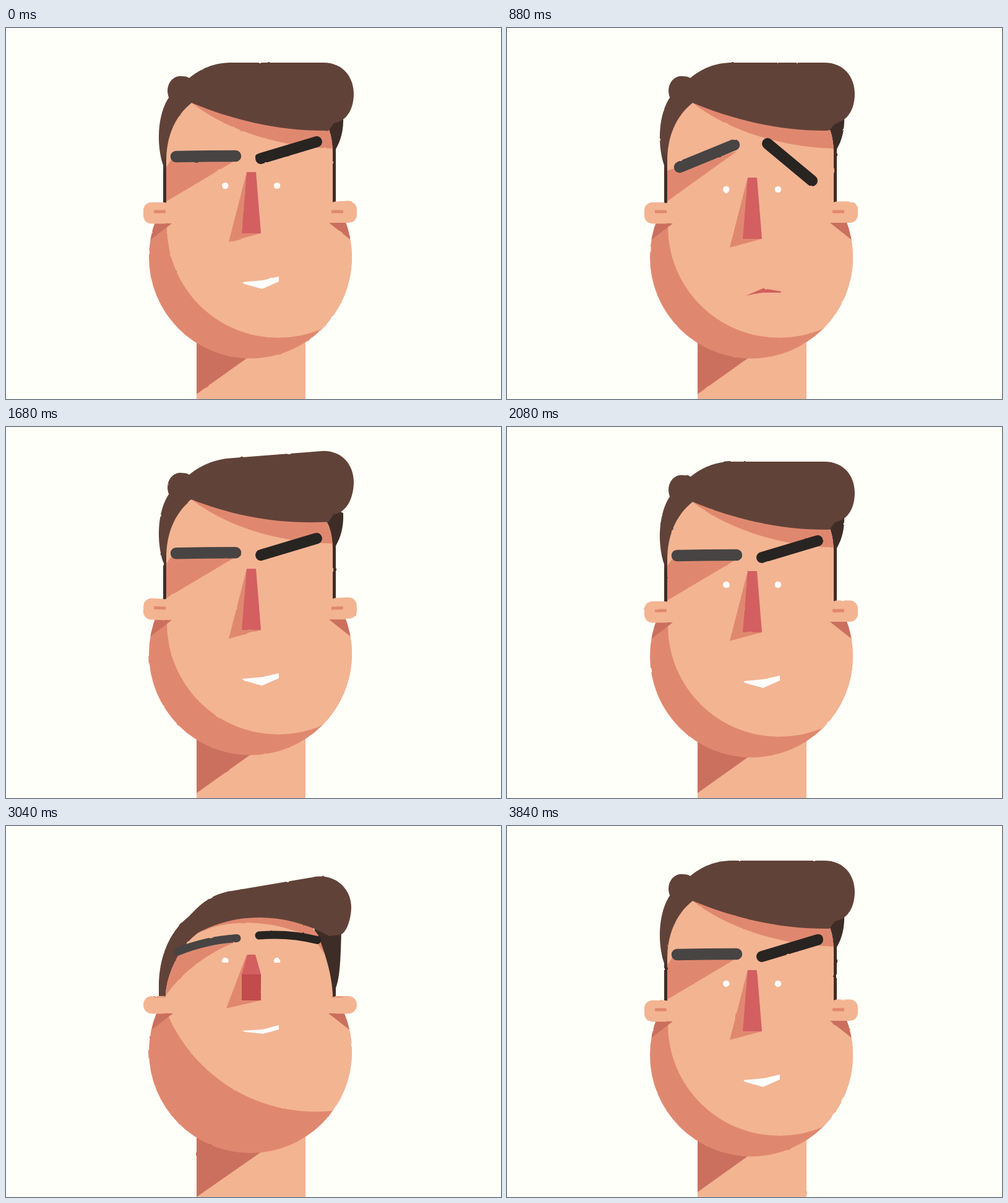
An HTML page with a canvas for the animation above (3880 ms loop, 800 by 600 pixels).

```html
<!DOCTYPE html>
<html lang="en">
<head>
<meta charset="utf-8">
<title>Moods</title>
<style>
  html, body { margin: 0; width: 100%; height: 100%; overflow: hidden; background: #fefff8; }
  main { position: absolute; left: 0; top: 0; width: 800px; height: 600px; overflow: clip; }
  canvas { display: block; filter: url(#rough); }
  svg { position: absolute; left: 0; top: 0; width: 0; height: 0; }
</style>
</head>
<body>
<svg aria-hidden="true">
  <filter id="rough" x="0" y="0" width="100%" height="100%" color-interpolation-filters="sRGB">
    <feTurbulence id="grain" type="fractalNoise" baseFrequency="0.08" numOctaves="1" seed="1" result="n"/>
    <feDisplacementMap in="SourceGraphic" in2="n" scale="2.2" xChannelSelector="R" yChannelSelector="G"/>
  </filter>
</svg>
<main><canvas id="stage" width="800" height="606"></canvas></main>
<script>
const ctx = document.getElementById('stage').getContext('2d');
const grain = document.getElementById('grain');
const LOOP = 3880;
const C = {
  bg: '#fefff8', skin: '#f3b492', shade: '#e0886f', deep: '#cb705e',
  hair: '#614238', back: '#3e2d27', nose: '#d35f61', tip: '#c14b4d',
  browL: '#474443', browR: '#282421', white: '#ffffff'
};

// Eased value of a list of [time, value] keys
function track(t, keys) {
  if (t <= keys[0][0]) return keys[0][1];
  for (let i = 1; i < keys.length; i++) {
    const [t0, a] = keys[i - 1], [t1, b] = keys[i];
    if (t < t1) {
      const k = (t - t0) / (t1 - t0);
      return a + (b - a) * k * k * (3 - 2 * k);
    }
  }
  return keys[keys.length - 1][1];
}

const HOPS = [120, 1400];
const BLINKS = [120, 1400, 2040, 3040];
const hop = (t, keys) => HOPS.reduce((sum, s) => sum + track(t - s, keys), 0);
const blink = t => BLINKS.reduce((sum, s) =>
  sum + track(t - s, [[60, 0], [140, 1], [310, 1], [400, 0]]), 0);

const MOTION = {
  sad: [[220, 0], [400, 1], [1500, 1], [1680, 0]],
  up: [[2140, 0], [2350, 1.03], [2460, 1], [3080, 1], [3270, -0.04], [3390, 0]],
  bob: [[0, 0], [80, 6], [200, -20], [350, 9], [480, 0]],
  flop: [[0, 0], [130, 10], [235, -30], [355, 20], [480, 0]],
  ear: [[0, 0], [120, 8], [230, -9], [355, 8], [480, 0]],
  tuft: [[2130, 0], [2240, -30], [2380, 8], [2460, 0],
         [3080, 0], [3180, 12], [3300, -13], [3400, 0]]
};

let sad, up, flop;

// Blend of the smirk, sad and raised poses
const mix = (s, d = s, u = s) => s + (d - s) * sad + (u - s) * up;

function shape(s, d, u, bend = 0) {
  const nums = str => str.match(/[\d.]+/g).map(Number);
  const a = nums(s), b = d ? nums(d) : a, c = u ? nums(u) : a;
  const v = a.map((n, i) => mix(n, b[i], c[i]));
  if (bend) {
    for (let i = 0; i < v.length; i += 2) {
      const w = Math.min(1, Math.max(0, (v[i] - 340) / 170));
      v[i + 1] += flop * bend * w * (v[i + 1] > 140 ? 0.65 : 1);
    }
  }
  let i = 0;
  return new Path2D(s.replace(/[\d.]+/g, () => v[i++].toFixed(2)));
}

function fill(path, color) {
  ctx.fillStyle = color;
  ctx.fill(path);
}

function disc(x, y, r) {
  const p = new Path2D();
  p.arc(x, y, r, 0, 7);
  return p;
}

function box(x, y, w, h, r = 0) {
  const p = new Path2D();
  p.roundRect(x, y, w, h, r);
  return p;
}

function clipped(path, draw) {
  ctx.save();
  ctx.clip(path);
  draw();
  ctx.restore();
}

function neck() {
  fill(box(308, 460, 176, 160), C.skin);
  fill(shape('M308 480L465 480L308 592Z', null, 'M308 480L480 480L308 600Z'), C.deep);
}

function backHair() {
  const y = mix(200, 200, 275), g = ctx.createLinearGradient(0, y, 0, y + 35);
  g.addColorStop(0, C.hair);
  g.addColorStop(1, C.back);
  fill(shape(
    'M254 285L254 222C243 190 244 140 264 111C285 85 300 100 330 110L330 285Z', null,
    'M247 280L247 260C247 215 262 172 296 146C306 134 320 130 330 130L330 280Z'), g);
  fill(shape(
    'M533 285L533 196C541 182 546 165 545 143L500 120L500 285Z', null,
    'M533 280L533 262C540 245 541 210 542 168L500 150L490 280Z'), C.back);
}

function jaw() {
  const top = mix(290, 290, 280);
  clipped(box(200, top, 400, 300), () => {
    const chin = disc(395, mix(370.5, 370.5, 365), 164);
    fill(chin, C.shade);
    clipped(chin, () => {
      fill(disc(mix(440, 440, 500), mix(321, 321, 202), mix(180, 180, 260)), C.skin);
      fill(shape('M220 316L268 316L220 353Z', null, 'M220 303L270 303L220 341Z'), C.deep);
      fill(shape('M522 315L570 315L570 353Z', null, 'M521 303L570 303L570 341Z'), C.deep);
    });
  });
}

function face() {
  const skin = shape(
    'M259 305L259 215C259 180 270 145 300 121C370 85 480 85 520 160C525 170 527 182 528 198L528 305Z', null,
    'M258 295L258 272C260 240 280 195 310 173C350 115 455 105 504 176C512 198 526 232 528 272L528 295Z');
  fill(skin, C.skin);
  clipped(skin, () => {
    fill(shape(
      'M300 121C350 160 430 192 530 195L531 195L531 80L300 80Z', null,
      'M318 170C360 150 440 150 500 185L531 232L531 80L300 80Z', 0.3), C.shade);
    fill(shape(
      'M250 237L268 212L371 214Q314 248 258 281L250 286Z',
      'M250 233L279 225L372 199Q315 240 258 281L250 286Z',
      'M250 245L278 203L372 187Q300 216 258 274L250 280Z'), C.shade);
  });
}

function nose() {
  fill(shape('M389 233L360 346L412 332Z', 'M389 242L360 355L412 341Z', 'M389 208L356 295L412 282Z'), C.shade);
  fill(shape(
    'M389 233L404 233L412 332L381 332Z',
    'M389 242L404 242L412 341L381 341Z',
    'M390 208L403 208L412 240L381 240Z'), C.nose);
  fill(shape(
    'M381 332L412 332L412 332L381 332Z',
    'M381 341L412 341L412 341L381 341Z',
    'M381 240L412 240L412 282L381 282Z'), C.tip);
}

function eye(x, lid) {
  const r = 5.3, y = mix(255, 261, 218);
  const top = y - r + 2 * r * Math.min(1, lid);
  const bottom = y + mix(r, r, 3);
  if (bottom > top) clipped(box(x - 8, top, 16, bottom - top), () => fill(disc(x, y, r), C.white));
}

function mouth() {
  fill(shape(
    'M382 411L415 408L441 402L441 410L414 422L385 414Z',
    'M386 433L414 421L443 426L443 428L414 428L400 430Z',
    'M382 331L415 329L441 322L441 329L416 336L386 333Z'), sad > 0.5 ? C.nose : C.white);
}

function ear(x, y, h, mark, pivot, turn) {
  ctx.save();
  ctx.translate(pivot, 299);
  ctx.rotate(turn * Math.PI / 180);
  ctx.translate(-pivot, -299);
  fill(box(x, mix(y, y, 275), 46, mix(h, h, 28.5), mix(13, 13, 14)), C.skin);
  fill(box(mark, mix(294.5, 294.5, 276), 19, mix(5, 5, 1.2), mix(1, 1, 0.4)), C.shade);
  ctx.restore();
}

function topHair() {
  fill(shape(
    'M263 112C256 92 270 76 284 78C290 78 294 79 296 81C315 66 335 56 365 56' +
    'L513 56C545 56 562 80 562 106C562 130 552 150 530 154L521 166C440 167 365 148 300 121Z', null,
    'M264 187C271 173 280 162 289 153C292 150 296 146 300 142C318 122 337 109 365 105' +
    'L495 83C530 75 558 100 558 131C558 150 550 174 540 176L522 178C450 138 370 140 310 173Z', 1), C.hair);
}

function brow(color, width, ...poses) {
  ctx.strokeStyle = color;
  ctx.lineWidth = mix(width, width, 13);
  ctx.lineCap = 'round';
  ctx.stroke(shape(...poses));
}

function draw(t) {
  sad = track(t, MOTION.sad);
  up = track(t, MOTION.up);
  flop = hop(t, MOTION.flop) + track(t, MOTION.tuft);
  const turn = hop(t, MOTION.ear);

  ctx.fillStyle = C.bg;
  ctx.fillRect(0, 0, 800, 606);
  neck();
  ctx.save();
  ctx.translate(0, hop(t, MOTION.bob));
  backHair();
  jaw();
  face();
  nose();
  eye(354.3, blink(t));
  eye(438, blink(t - 20));
  mouth();
  ear(222, 282, 34.5, 239, 262, -turn);
  ear(521, 280.5, 34.5, 526, 527, turn);
  topHair();
  brow(C.browL, 18.5, 'M275 208Q323 207 371 207', 'M279 225Q323 207 367 189', 'M278 203Q322 185 373 181.5');
  brow(C.browR, 18, 'M412 211Q457 197.5 502 184', 'M421 187Q457 217 493 247', 'M409 177Q458 173 503 184.5');
  ctx.restore();
}

function tick(now) {
  const t = now % LOOP;
  grain.setAttribute('seed', 1 + Math.floor(t / 40));
  draw(t);
  requestAnimationFrame(tick);
}
tick(performance.now());
</script>
</body>
</html>
```
